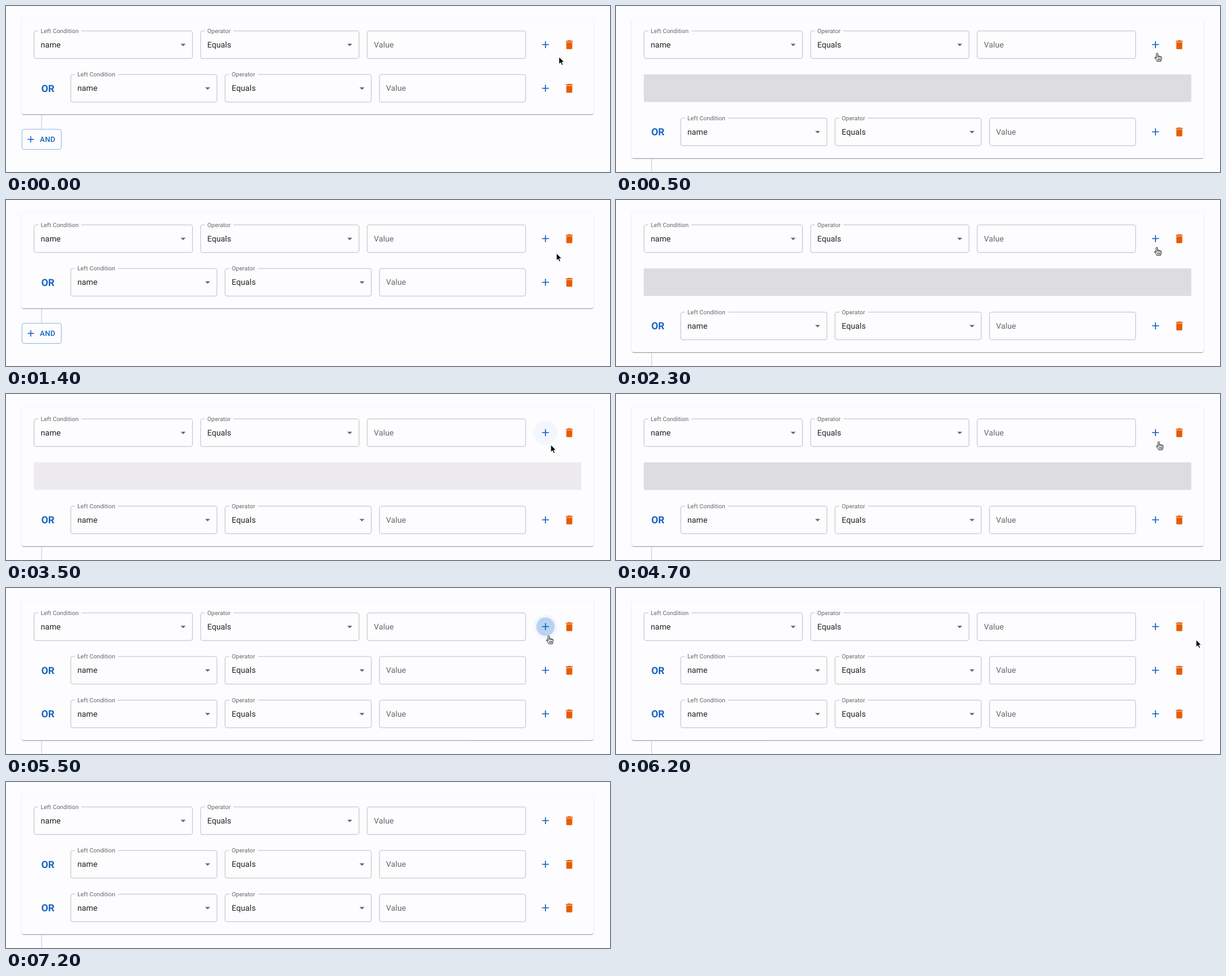
Animation, 1000 px wide and 276 px high, one loop 7300 ms. Source, as an HTML page:

```html
<!DOCTYPE html>
<html lang="en">
<head>
<meta charset="utf-8">
<title>Condition builder</title>
<style>
  html, body { margin: 0; width: 100%; height: 100%; overflow: hidden; background: #fdfcfe; }
  #card {
    position: absolute; left: 26px; top: 20.5px; width: 946.5px; border-radius: 3.3px; background: #fdfcfe;
    box-shadow: 0 1.64px .82px -.82px rgba(0,0,0,.3), 0 .82px .82px rgba(0,0,0,.18), 0 .82px 2.5px rgba(0,0,0,.12);
  }
  svg { position: absolute; left: 0; top: 0; display: block; }
  text { font-family: Roboto, Arial, sans-serif; white-space: pre; text-rendering: geometricPrecision; }
  .value { font-size: 13.12px; letter-spacing: .12px; fill: #212121; }
  .hint { fill: #686868; }
  .label { font-size: 9.84px; letter-spacing: .09px; fill: #666; }
  .or { font-size: 16.4px; font-weight: 700; fill: #1565c0; }
  .and { font-size: 12.3px; font-weight: 500; letter-spacing: .35px; fill: #1565c0; }
  .frame { fill: none; stroke: #c0bfc1; stroke-width: 1; }
</style>
</head>
<body>
<div id="card"></div>
<svg width="1000" height="276" viewBox="0 0 1000 276">
  <defs>
    <path id="plus" d="M19 13h-6v6h-2v-6H5v-2h6V5h2v6h6v2z"/>
    <path id="bin" d="M6 19c0 1.1.9 2 2 2h8c1.1 0 2-.9 2-2V7H6v12zM19 4h-3.5l-1-1h-5l-1 1H5v2h14V4z"/>
    <path id="caret" d="M7 10l5 5 5-5z"/>
    <clipPath id="reveal"><rect id="window" x="0" y="87.2" width="1000" height="0"/></clipPath>
  </defs>
  <circle id="hover" cx="893.2" cy="64.2" r="19.7" fill="#1976d2" fill-opacity=".045"/>
  <circle id="ripple" cx="893.2" cy="64.2" fill="#1976d2"/>
  <g id="first"></g>
  <g clip-path="url(#reveal)"><rect id="skeleton" x="46" y="113.7" width="906.5" height="46" fill="#dddcde"/></g>
  <g id="added"></g>
  <g id="second"></g>
  <g id="footer"></g>
  <g id="cursor">
    <path id="arrow" d="M0 0V12.2L2.8 9.6 4.7 14 6.8 13.1 4.9 8.8H8.6Z" fill="#000" stroke="#fff" stroke-width=".9" stroke-linejoin="round"/>
    <g id="hand" stroke="#111" stroke-width=".95" stroke-linejoin="round" stroke-linecap="round">
      <path fill="#fff" d="M-1.3 8.5V1.2C-1.3-.3 1.1-.3 1.1 1.2V5.1C1.5 4.3 3.2 4.5 3.3 5.6 3.8 4.9 5.3 5.2 5.4 6.2 6 5.6 7.3 6 7.3 7.2V9.5C7.3 11 6.2 11.6 6.2 13.6H-.2C-.4 11.9-2.3 10.3-3.9 8.3-4.7 7.2-3.3 6-2.2 7.3Z"/>
      <path fill="none" d="M1.1 5.1V7M3.3 5.6V7.2M5.4 6.2V7.5M1.3 9.3V11.6M3.2 9.3V11.6M5.1 9.3V11.6"/>
    </g>
  </g>
</svg>
<script>
const LOOP = 7300, STEP = 100, PITCH = 72.5, ICON = 0.82, PAD = 11;
const $ = id => document.getElementById(id);
const show = (id, on) => $(id).setAttribute('visibility', on ? 'visible' : 'hidden');

const text = (cls, x, y, str) => `<text class="${cls}" x="${x}" y="${y}">${str}</text>`;
const icon = (id, x, y, fill, s = ICON) =>
  `<use href="#${id}" fill="${fill}" transform="translate(${x - 12 * s} ${y - 12 * s}) scale(${s})"/>`;

// Outlined box whose top edge is open from a to b
function outline(l, r, y, a, b) {
  const q = 3.3, t = y - 22.8, d = y + 23.1;
  return `<path class="frame" d="M${b} ${t}H${r - q}a${q} ${q} 0 0 1 ${q} ${q}V${d - q}a${q} ${q} 0 0 1 ${-q} ${q}` +
    `H${l + q}a${q} ${q} 0 0 1 ${-q} ${-q}V${t + q}a${q} ${q} 0 0 1 ${q} ${-q}H${a}"/>`;
}

function select(l, r, y, label, value, labelWidth) {
  const x = l + PAD;
  return outline(l, r, y, x - 4, x + labelWidth + 4.3) +
    text('label', x, y - 19.4, label) + text('value', x, y + 4.4, value) +
    icon('caret', r - 15.4, y + 0.1, '#666');
}

// Three equal columns that end at the same right edge
function row(y, left) {
  const right = 860.3, gap = 13.5, width = (right - left - 2 * gap) / 3;
  const col = i => left + i * (width + gap);
  return select(col(0), col(0) + width, y, 'Left Condition', 'name', 63) +
    select(col(1), col(1) + width, y, 'Operator', 'Equals', 39) +
    outline(col(2), right, y, col(2) + 8, col(2) + 8) +
    text('value hint', col(2) + PAD, y + 4.4, 'Value') +
    icon('plus', 893.2, y, '#1565c0') + icon('bin', 932.6, y + 0.2, '#e65c00');
}

$('first').innerHTML = row(64.2, 46.4);
$('second').innerHTML = $('added').innerHTML = text('or', 58.5, 142.6, 'OR') + row(136.7, 107.2);
$('footer').innerHTML =
  '<path d="M59 181V205" stroke="#c6c5c7"/>' +
  '<rect x="26.5" y="205" width="65" height="33.5" rx="3.3" fill="none" stroke="#8fb8e4"/>' +
  icon('plus', 41, 221.8, '#1565c0', 0.75) + text('and', 56, 226.1, 'AND');

const clamp = v => Math.max(0, Math.min(1, v));
const ramp = (t, from, to) => clamp((t - from) / (to - from));
const ease = v => v * v * (3 - 2 * v);
const mix = (a, b, k) => a + (b - a) * k;

// The pointer glides to each stop in turn; "over" stops rest on the plus button
const GLIDE = 300, CLICK = 5400, GONE = 6300;
const stops = [
  { at: -GLIDE, x: 915.5, y: 84.5 },
  { at: 0, x: 896, y: 78.3, over: true },
  { at: 800, x: 911.3, y: 88.5 },
  { at: 1800, x: 895.5, y: 78.5, over: true },
  { at: 3200, x: 902, y: 84.5 },
  { at: 4300, x: 898.6, y: 79.2, over: true },
  { at: 5900, x: 960.5, y: 86 }
];

function draw(t) {
  const i = stops.findLastIndex(s => s.at <= t);
  const from = stops[i - 1], to = stops[i], age = t - to.at;
  const k = ease(ramp(age, 0, GLIDE));
  const x = mix(from.x, to.x, k), y = mix(from.y, to.y, k);
  const inside = Math.hypot(x - 893.2, y - 64.2) < 20;
  $('cursor').setAttribute('transform', `translate(${x} ${y})`);
  show('arrow', t < GONE && !inside);
  show('hand', t < GONE && inside);

  // Entering opens the gap; leaving fades the preview first, then closes the gap
  const clicked = t >= CLICK;
  const fade = to.over ? ramp(age, 0, 400) : 1 - ramp(age, 100, 500);
  const open = clicked ? 1 : ease(to.over ? ramp(age, 0, 400) : 1 - ramp(age, 300, 600));
  const shift = PITCH * open;

  $('card').style.height = 159.5 + shift + 'px';
  $('window').setAttribute('height', shift);
  $('skeleton').setAttribute('opacity', fade);
  show('skeleton', !clicked);
  show('added', clicked);
  for (const id of ['second', 'footer']) $(id).setAttribute('transform', `translate(0 ${shift})`);

  show('hover', (t >= 3200 && t < 3700) || (clicked && t < 6100));
  $('ripple').setAttribute('r', 19.5 * Math.sin(ramp(t, CLICK - 100, CLICK + 250) * Math.PI / 2));
  $('ripple').setAttribute('opacity', 0.27 * (1 - ramp(t, CLICK + 200, CLICK + 700)));
  show('ripple', clicked);
}

const start = performance.now();
function tick() {
  const t = (performance.now() - start) % LOOP;
  draw(Math.floor(t / STEP) * STEP);
  requestAnimationFrame(tick);
}
tick();
</script>
</body>
</html>
```
